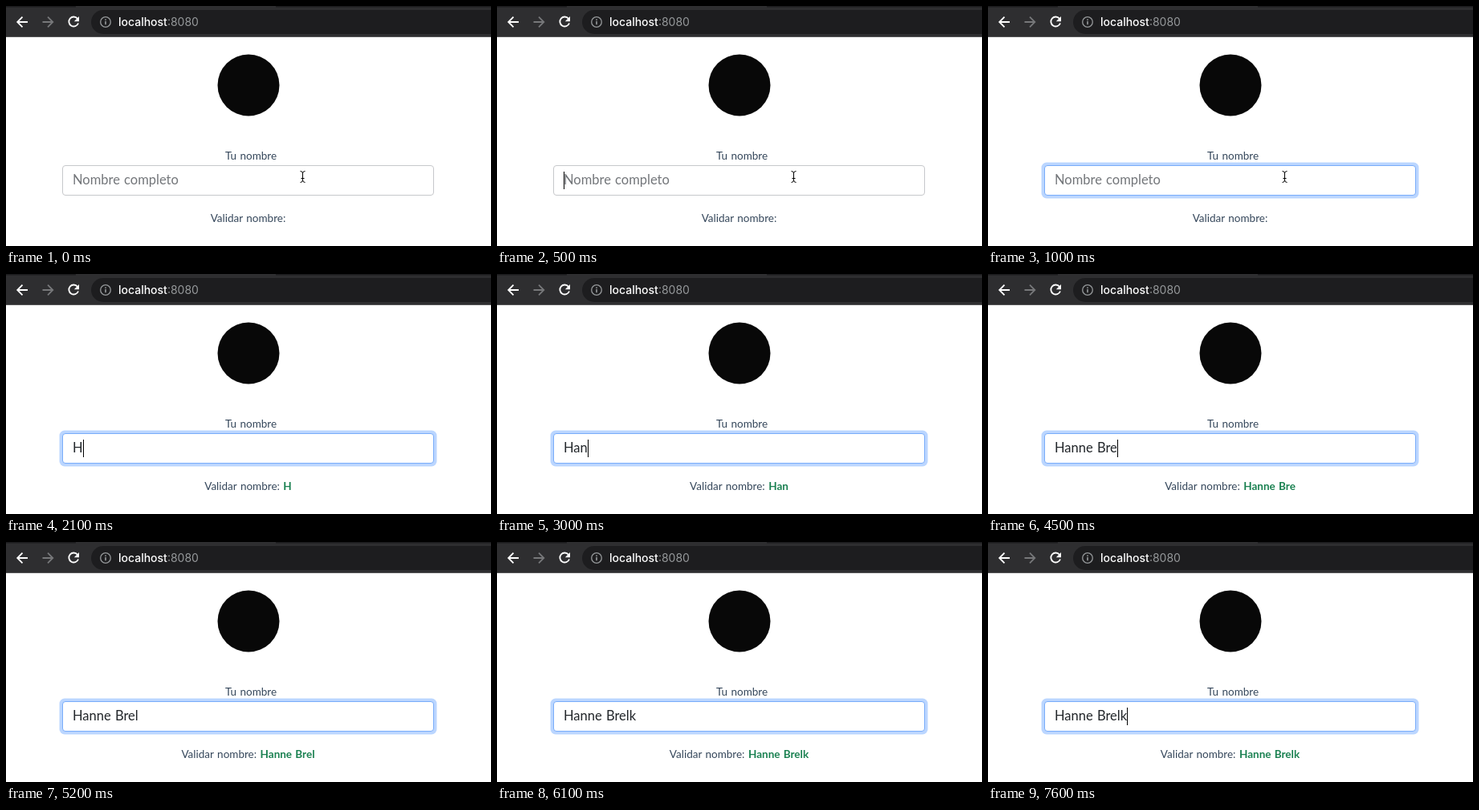
Write an HTML page that moves like this. It is 604x300 px and loops after 8000 ms.

```html
<!DOCTYPE html>
<html lang="es">
<head>
<meta charset="utf-8">
<style>
  html, body { margin: 0; width: 100%; height: 100%; overflow: hidden; background: #fff; }
  svg { display: block; width: 604px; height: 300px; }
  .line { fill: none; stroke: #fff; stroke-width: 1.8; }
  .url { font: 500 14px Inter, sans-serif; fill: #fff; }
  .dim { font-weight: 400; fill: #96999b; }
  .label { font: 13.5px Lato, sans-serif; fill: #34465a; text-anchor: middle; word-spacing: 1px; }
  .field { font: 16.5px Lato, sans-serif; word-spacing: 1px; }
  #echo { font-weight: 700; fill: #198050; }
</style>
</head>
<body>
<svg viewBox="0 0 604 300">
  <!-- browser bar -->
  <rect width="604" height="39" fill="#2e2e30"/>
  <path fill="#1b1b1d" d="M0 0h87v1.500H0zM336 0h268v1.500H336z"/>
  <rect y="38" width="604" height="1" fill="#565658"/>
  <rect x="106" y="5" width="540" height="30" rx="15" fill="#1d1d1f"/>
  <path class="line" d="M27 20H14.500M20.500 13.700L14.200 20l6.300 6.300"/>
  <path class="line" style="stroke:#77787a" d="M45.500 20H58M52 13.700L58.300 20 52 26.300"/>
  <path class="line" d="M89 15.700A6 6 0 1 0 90 21.500"/>
  <path fill="#fff" d="M91 13v6.200h-6.200z"/>
  <circle class="line" cx="124" cy="20" r="6.300" style="stroke:#96999b;stroke-width:1.3"/>
  <path class="dim" d="M123.200 19h1.600v4.300h-1.600zM123.200 16.500h1.600v1.600h-1.600z"/>
  <text class="url" x="140" y="25">localhost<tspan class="dim">:8080</tspan></text>

  <!-- page -->
  <circle cx="302" cy="99" r="38.500" fill="#080808"/>
  <text class="label" x="305" y="192">Tu nombre</text>
  <rect id="ring" x="66.500" y="195.500" width="470" height="45" rx="6.500" fill="#0d6efd" fill-opacity=".28"/>
  <rect id="box" x="70.500" y="199.500" width="462" height="37" rx="3.500" fill="#fff"/>
  <text id="hint" class="field" x="83" y="223" fill="#73767a">Nombre completo</text>
  <text id="typed" class="field" x="83" y="223" fill="#212529"></text>
  <rect id="caret" y="207" width="1" height="22"/>
  <path id="mouse" fill="none" stroke="#000"
    d="M366.500 206.500q3 0 3 2.500v8.500q0 3-3 3M372.500 206.500q-3 0-3 2.500v8.500q0 3 3 3M367.500 215.500h4"/>
  <text class="label" x="301.500" y="270">Validar nombre: <tspan id="echo"></tspan></text>
</svg>
<script>
const el = id => document.getElementById(id);
const [ring, box, hint, typed, caret, mouse, echo] =
  ['ring', 'box', 'hint', 'typed', 'caret', 'mouse', 'echo'].map(el);
const show = (node, on) => node.style.visibility = on ? 'visible' : 'hidden';

const LOOP = 8000, FOCUS = 500, FADE = 150, BLINK = 500;
const NAME = 'Hanne\u00a0Brelk';
const KEYS = [1900, 2400, 2900, 3100, 3200, 3500, 4000, 4200, 4500, 4600, 5600];
const GREY = [198, 200, 203], BLUE = [120, 172, 250];

function draw(t) {
  const p = Math.min(1, Math.max(0, (t - FOCUS) / FADE));
  const glow = p * p * (3 - 2 * p);
  ring.style.opacity = glow;
  box.style.stroke = `rgb(${GREY.map((g, i) => g + (BLUE[i] - g) * glow)})`;

  const count = KEYS.filter(k => k <= t).length;
  const text = NAME.slice(0, count);
  if (typed.textContent !== text) {
    typed.textContent = text;
    echo.textContent = text.trim();
  }
  show(hint, !count);
  show(mouse, !count);

  // each key press restarts the blink
  const since = t - (count ? KEYS[count - 1] : FOCUS);
  show(caret, since >= 0 && Math.floor(since / BLINK) % 2 === 0);
  caret.setAttribute('x', Math.round(83 + (count ? typed.getComputedTextLength() : 0)));
}

const start = performance.now();
function tick() {
  draw((performance.now() - start) % LOOP);
  requestAnimationFrame(tick);
}
tick();
</script>
</body>
</html>
```
